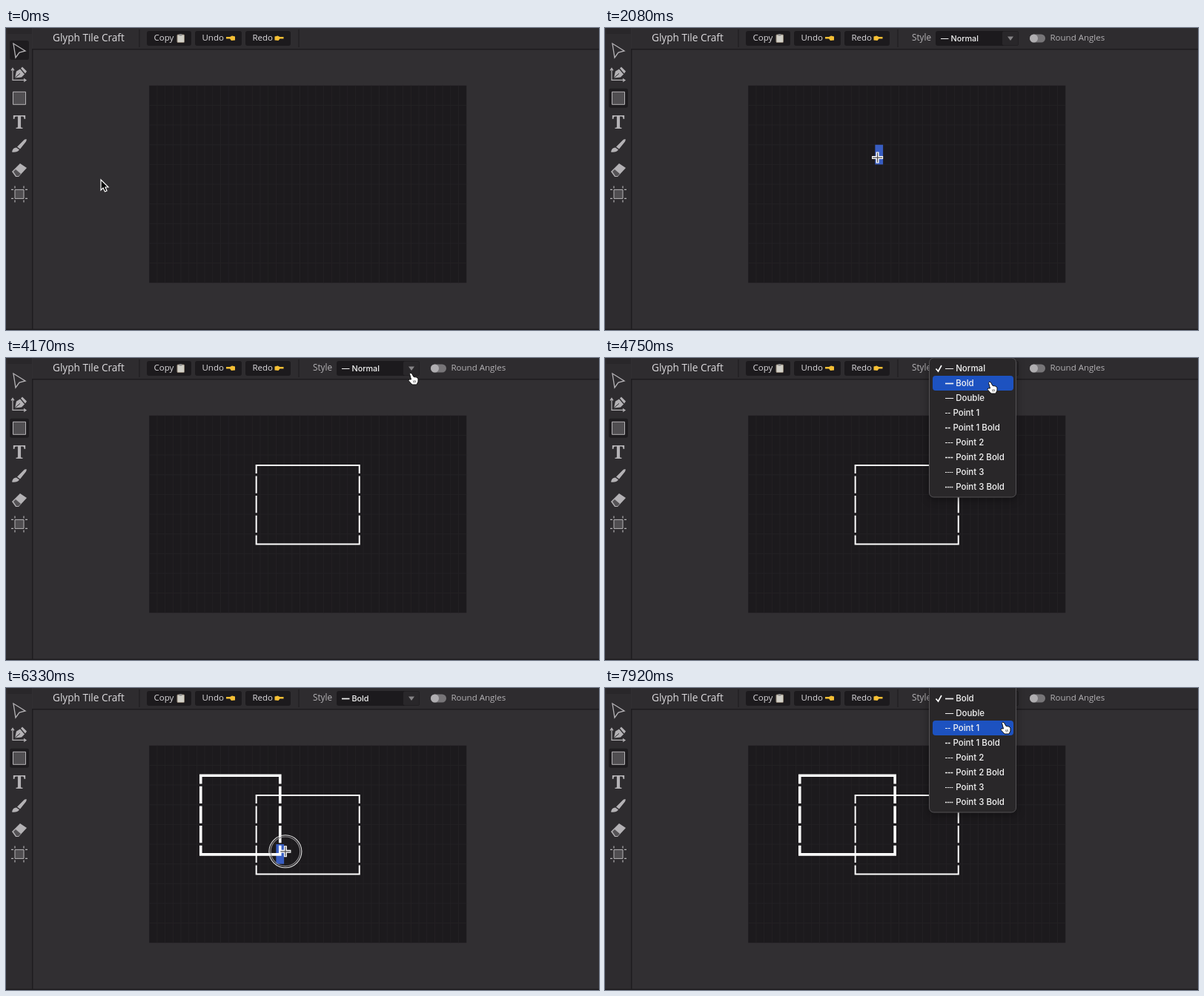
An HTML page with a canvas for the animation above (8 s loop, 800 by 408 pixels).

```html
<!DOCTYPE html>
<html lang="en">
<head>
<meta charset="utf-8">
<title>Text box drawing</title>
<style>
html, body { margin: 0; width: 100%; height: 100%; overflow: hidden; background: #312f32; }
canvas { display: block; }
</style>
</head>
<body>
<canvas id="stage" width="800" height="408"></canvas>
<script>
const g = document.getElementById('stage').getContext('2d');
const STEP = 250 / 3, LOOP = 8000;
const COLS = 40, ROWS = 10, CELL_W = 10.7, CELL_H = 26.65, LEFT = 193.2, TOP = 77.8;
const UI = '"Open Sans", sans-serif', MENU = 'Inter, sans-serif';
const BACK = '#312f32', BAR = '#2e2c2f', DARK = '#1c1a1d', INK = '#b4b2b5';

const STYLES = ['Normal', 'Bold', 'Double',
  ...[1, 2, 3].flatMap(n => [`Point ${n}`, `Point ${n} Bold`])];

const cellX = c => LEFT + (c + 0.5) * CELL_W;
const cellY = r => TOP + (r + 0.5) * CELL_H;
const cell = (c, r) => [cellX(c), cellY(r)];
const toolY = i => 30 + 32.4 * i;

// Pointer script: start step, end step, goal, steps held down after arrival, drag
const START = [128, 205], SELECT = [547, 20];
const MOVES = [
  [6, 11, [17, toolY(2)], 2],
  [15, 25, cell(15.8, 3.15)],
  [26, 29, cell(13, 2)],
  [31, 39, cell(26, 6), 5, true],
  [45, 50, SELECT, 2],
  [55, 57, [520, 32], 2],
  [60, 63, [311, 121]],
  [63, 67, cell(6, 1)],
  [70, 79, cell(18, 5.35), 0, true],
  [83, 88, SELECT, 2],
  [92, 95, [538, 46]],
];

function pointer(k) {
  return MOVES.reduce((pos, [from, to, goal]) => {
    const u = Math.min(1, Math.max(0, (k - from) / (to - from)));
    const eased = 1 - (1 - u) ** 2;
    return pos.map((v, i) => v + (goal[i] - v) * eased);
  }, START);
}

const isPressed = k => MOVES.some(([from, to, , hold = 0, drag]) =>
  k > (drag ? from - 2 : to) && k <= to + hold);

// The grid reacts slightly later than the pointer
function cellAt(k) {
  const [x, y] = pointer(k - 0.35);
  return [Math.floor((x - LEFT) / CELL_W), Math.floor((y - TOP) / CELL_H)];
}

function rect(x, y, w, h, fill, r = 0, stroke) {
  g.beginPath();
  g.roundRect(x, y, w, h, r);
  if (fill) { g.fillStyle = fill; g.fill(); }
  if (stroke) { g.strokeStyle = stroke; g.lineWidth = 1; g.stroke(); }
}

function shape(d, fill, stroke, width = 1) {
  const p = new Path2D(d);
  if (fill) { g.fillStyle = fill; g.fill(p); }
  if (stroke) { g.strokeStyle = stroke; g.lineWidth = width; g.stroke(p); }
}

function text(s, x, y, size, color, family = UI, weight = 400) {
  g.font = `${weight} ${size}px ${family}`;
  g.fillStyle = color;
  g.fillText(s, x, y);
}

function placed(x, y, paint, flip = 1) {
  g.save();
  g.translate(x, y);
  g.scale(flip, 1);
  paint();
  g.restore();
}

function styleLabel(name, x, y, size) {
  const points = +(name.match(/\d/) ?? 0), bold = name.endsWith('Bold');
  const len = size * (points === 1 ? 0.65 : 0.97);
  g.setLineDash(points ? [len / (points + 1) - 0.8, 0.8] : []);
  shape(`M${x} ${y + 0.5}h${len}`, null, '#f0f0f0', bold ? 1.7 : 1);
  g.setLineDash([]);
  text(name, x + len + 3, y + 0.5, size, '#f4f4f4', MENU, 500);
}

const ICONS = [
  () => shape('M-8-9L8 1 0 3-5 10Z', null, INK, 1.3),
  () => {
    shape('M-9-7V8H9M-11-5L-9-8-7-5M6 6L9 8 6 10', null, INK, 1.2);
    shape('M-6 5L-4-4 1-7 7 0 3 4ZM2-8L4-10 10-4 8-1Z', INK);
    shape('M-6 5L1-1', null, BAR);
  },
  () => rect(-8.5, -8.5, 17, 17, '#504e51', 0, INK),
  () => {
    g.textAlign = 'center';
    text('T', 0, 1, 26, INK, '"Noto Serif", serif', 700);
  },
  () => shape('M10-9Q8-10 6-8L-3 1 1 4 9-6ZM-4 2Q-9 2-10 8-3 9 0 5Z', INK),
  () => {
    shape('M-10 2L1-9 10-3-1 9H-5Z', INK);
    shape('M-8 2L-5-1 2 5-1 8H-4Z', '#555356');
  },
  () => {
    rect(-6, -6, 12, 12, '#504e51', 0, INK);
    for (const a of [-6, 6]) for (const b of [-11, 8]) {
      shape(`M${a} ${b}v3M${b} ${a}h3`, null, INK, 1.2);
    }
  },
];

function drawTools(selected) {
  rect(0, 0, 35, 408, BAR);
  rect(2, 0, 33, 8, '#29272a');
  rect(35, 28, 1.5, 380, '#1e1c1f');
  rect(5, toolY(selected) - 13, 26, 26, '#1e1c1f', 3);
  ICONS.forEach((icon, i) => placed(18, toolY(i), icon));
}

function button(x, w, label) {
  rect(x, 4, w, 20, DARK, 3);
  text(label, x + 9.5, 14, 11.5, '#dddbde');
}

const pointingHand = () =>
  shape('M-6-1.500H-1L2-3 6-2V3L1 3.500-1 1H-6Z', '#f5bf35');

function drawTopBar(boxTool, style) {
  rect(36, 0, 764, 28, BAR);
  rect(36, 28, 764, 1.5, '#1e1c1f');
  rect(179.5, 2, 1, 24, '#1d1b1e');
  rect(394.5, 2, 1, 24, '#1d1b1e');
  text('Glyph Tile Craft', 63, 14, 13.6, '#dddbde');
  button(190, 60, 'Copy');
  button(255, 63, 'Undo');
  button(323, 61, 'Redo');
  rect(231, 9, 9.5, 10.5, '#d2d0c8', 1, '#8d8172');
  rect(233.5, 8, 4, 2.5, '#8b8b8b', 1);
  placed(303, 13.5, pointingHand);
  placed(368.5, 13.5, pointingHand, -1);
  if (!boxTool) return;
  text('Style', 414, 14, 11.7, '#b5b3b6');
  rect(446, 4, 112, 20, DARK, 3);
  rect(536, 4.5, 21.5, 19, '#29272a', 2);
  shape('M543 11.500H551L547 17Z', '#858386');
  styleLabel(STYLES[style], 453, 14, 10.8);
  rect(573, 8.5, 21, 11, '#777578', 5.5);
  rect(573, 8.5, 11, 11, '#b0aeb1', 5.5);
  text('Round Angles', 600.5, 14, 11.5, '#b5b3b6');
}

function drawGrid() {
  const w = COLS * CELL_W, h = ROWS * CELL_H;
  rect(LEFT, TOP, w, h, DARK);
  let d = '';
  for (let c = 1; c < COLS; c++) d += `M${LEFT + c * CELL_W} ${TOP}v${h}`;
  for (let r = 1; r < ROWS; r++) d += `M${LEFT} ${TOP + r * CELL_H}h${w}`;
  shape(d, null, '#232124');
}

// Box-drawing characters leave a gap between text rows
function drawBox([c0, r0], [c1, r1], weight) {
  if (c0 === c1 && r0 === r1) return;
  const h = weight / 2, xs = [c0, c1].map(cellX), ys = [r0, r1].map(r => cellY(r) + 0.5);
  let d = ys.map(y => `M${xs[0] - h} ${y}H${xs[1] + h}`).join('');
  for (let r = r0; r <= r1; r++) {
    const top = TOP + r * CELL_H;
    const from = Math.max(ys[0], top + 1.7), to = Math.min(ys[1], top + CELL_H - 1.7);
    for (const x of xs) d += `M${x} ${from}V${to}`;
  }
  shape(d, null, '#fff', weight);
}

function drawMenu(selected, pointerY, alpha) {
  const rowY = i => 14 + 20 * (i - selected);
  const hover = selected + Math.round((pointerY - 14) / 20);
  const box = [437.5, rowY(0) - 14, 117, 188];
  g.save();
  g.globalAlpha = alpha;
  g.shadowColor = 'rgba(0,0,0,.4)';
  g.shadowBlur = 12;
  g.shadowOffsetY = 3;
  rect(...box, '#292729', 6);
  g.shadowColor = 'transparent';
  rect(...box, null, 6, '#545255');
  rect(442, rowY(hover) - 10, 109, 20, '#1d52c0', 4);
  STYLES.forEach((name, i) => styleLabel(name, 459, rowY(i), 11.5));
  shape('M446.500 14.500L449.500 18 454 10', null, '#fff', 1.6);
  g.restore();
}

function ring(r, color) {
  g.beginPath();
  g.arc(0, 0, r, 0, 2 * Math.PI);
  g.strokeStyle = color;
  g.lineWidth = 1.1;
  g.stroke();
}

const POINTERS = {
  arrow: () => shape('M0 0V14L3 11 5.500 16 8 15 6 10H10Z', '#000', '#fff', 1.2),
  cross: () => {
    shape('M-7.500 0H7.500M0-7.500V7.500', null, '#fff', 4);
    shape('M-6.500 0H6.500M0-6.500V6.500', null, '#4a484b', 1.2);
  },
  hand: () => {
    shape('M-2.500 1.500Q-1.500-1 .5 1L3 5.500 7 6 9 8V12L7 16H1L-4 10.500Q-4 8-.5 9Z', '#fff', '#111');
    shape('M2.500 10.500l1 3m1-3.500l1 3', null, '#333', 0.8);
  },
};

function pointerKind(k, x, y) {
  const choosing = (k >= 50 && k <= 63) || k >= 88;
  if (choosing || x < 35 || y < 29) return 'hand';
  const inGrid = x > LEFT && x < LEFT + COLS * CELL_W && y > TOP && y < TOP + ROWS * CELL_H;
  return inGrid ? 'cross' : 'arrow';
}

function draw(k) {
  const [x, y] = pointer(k), kind = pointerKind(k, x, y), boxTool = k >= 13;
  g.textBaseline = 'middle';
  rect(0, 0, 800, 408, BACK);
  drawTools(boxTool ? 2 : 0);
  drawTopBar(boxTool, k >= 64 ? 1 : 0);
  rect(0, 406.5, 800, 1.5, '#1e1c1f');
  drawGrid();
  if (kind === 'cross') {
    const [c, r] = cellAt(k);
    rect(LEFT + c * CELL_W, TOP + r * CELL_H, CELL_W, CELL_H, '#385dc2');
  }
  if (k >= 30) drawBox(cellAt(30), cellAt(Math.min(k, 40)), 2);
  if (k >= 69) drawBox(cellAt(69), cellAt(Math.min(k, 80)), 3.6);
  if (k >= 53 && k <= 63) drawMenu(0, pointer(Math.min(k, 59))[1], 0.5 ** Math.max(0, k - 59));
  if (k >= 92) drawMenu(1, y, 1);
  placed(x, y, () => {
    if (isPressed(k)) {
      ring(22, '#e4e4e4');
      ring(19.8, '#8b898c');
    }
    POINTERS[kind]();
  });
}

const start = performance.now();
function tick() {
  const t = (performance.now() - start) % LOOP;
  draw(Math.min(95, Math.floor((t + 5) / STEP)));
  requestAnimationFrame(tick);
}
tick();
</script>
</body>
</html>
```
